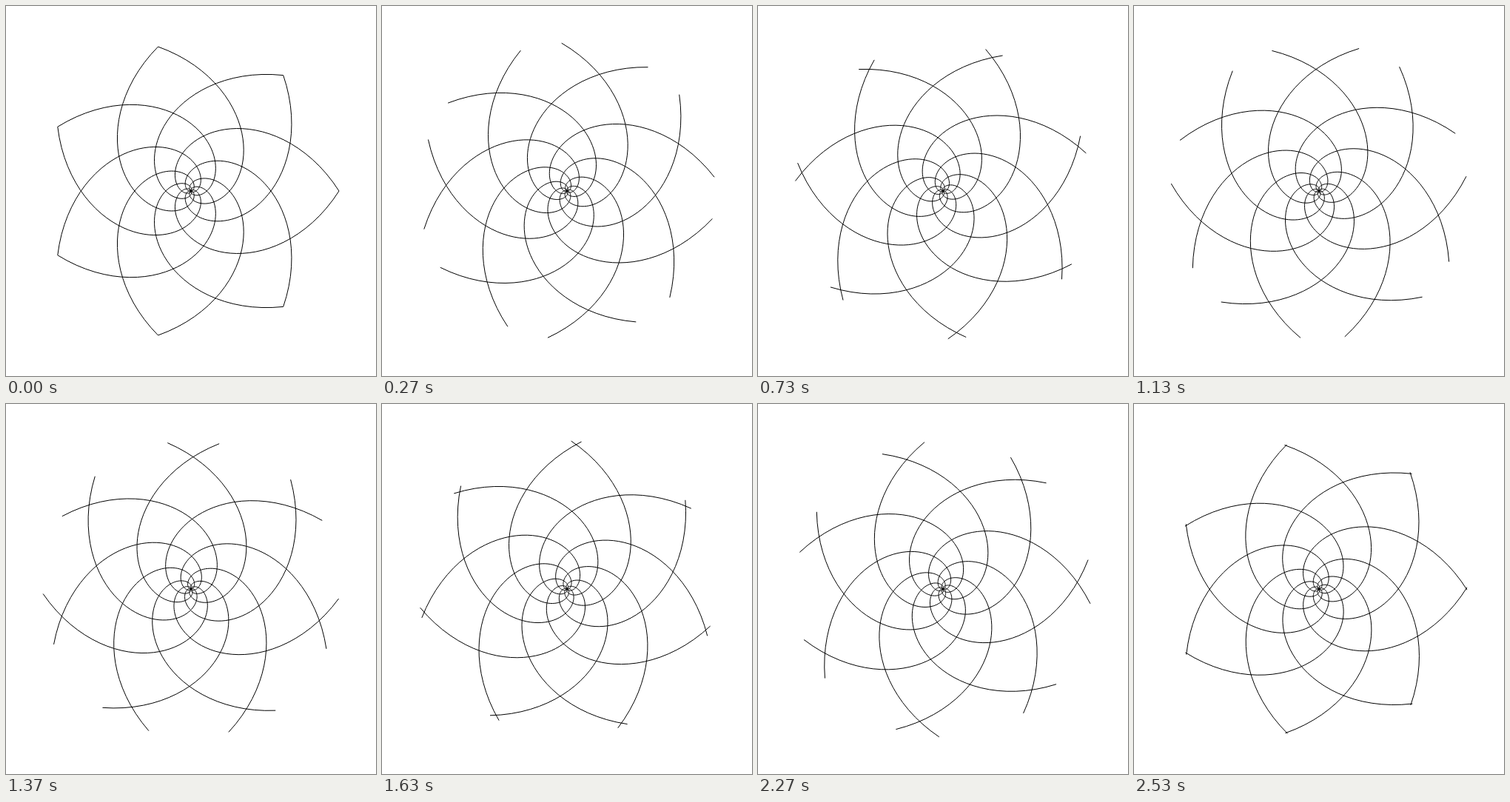
An HTML page with a canvas that plays this animation: 500x500 px, repeating every 2560 ms.

```html
<!DOCTYPE html>
<html lang="en">
<head>
<meta charset="utf-8">
<title>Counter-rotating spirals</title>
<style>
  html, body { margin: 0; width: 100%; height: 100%; overflow: hidden; background: #fff; }
  canvas { display: block; }
</style>
</head>
<body>
<canvas id="stage" width="500" height="500"></canvas>
<script>
const ctx = document.getElementById('stage').getContext('2d');
const TAU = Math.PI * 2;
const ARMS = 7, RADIUS = 200, CENTER = 250, SEGMENTS = 100;
const LOOP = 2560;
const STEP = TAU / ARMS / 76.45;

// One arm: radius grows with the fourth power over a full turn.
function arm(tip, dir) {
  for (let i = 0; i <= SEGMENTS; i++) {
    const u = 1 - i / SEGMENTS;
    const r = RADIUS * u ** 4;
    const a = tip + dir * TAU * (1 - u);
    const x = CENTER + r * Math.cos(a), y = CENTER - r * Math.sin(a);
    if (i) ctx.lineTo(x, y);
    else ctx.moveTo(x, y);
  }
}

function draw(step) {
  ctx.fillStyle = '#fff';
  ctx.fillRect(0, 0, 500, 500);
  ctx.strokeStyle = '#000';
  ctx.lineWidth = 1;
  ctx.lineJoin = 'round';
  for (let k = 0; k < ARMS; k++) {
    const base = k * TAU / ARMS;
    for (const [speed, dir] of [[1, 1], [-2, -1]]) {
      ctx.beginPath();
      arm(base + speed * step * STEP, dir);
      ctx.stroke();
    }
  }
}

// 30 steps per second, switching on 10 ms ticks.
function stepAt(ms) {
  const tick = Math.floor(ms / 10) * 10;
  return Math.floor((tick + 3.4) * 0.03);
}

const start = performance.now();
let shown = -1;
function frame() {
  const step = stepAt((performance.now() - start) % LOOP);
  if (step !== shown) draw(shown = step);
  requestAnimationFrame(frame);
}
frame();
</script>
</body>
</html>
```
